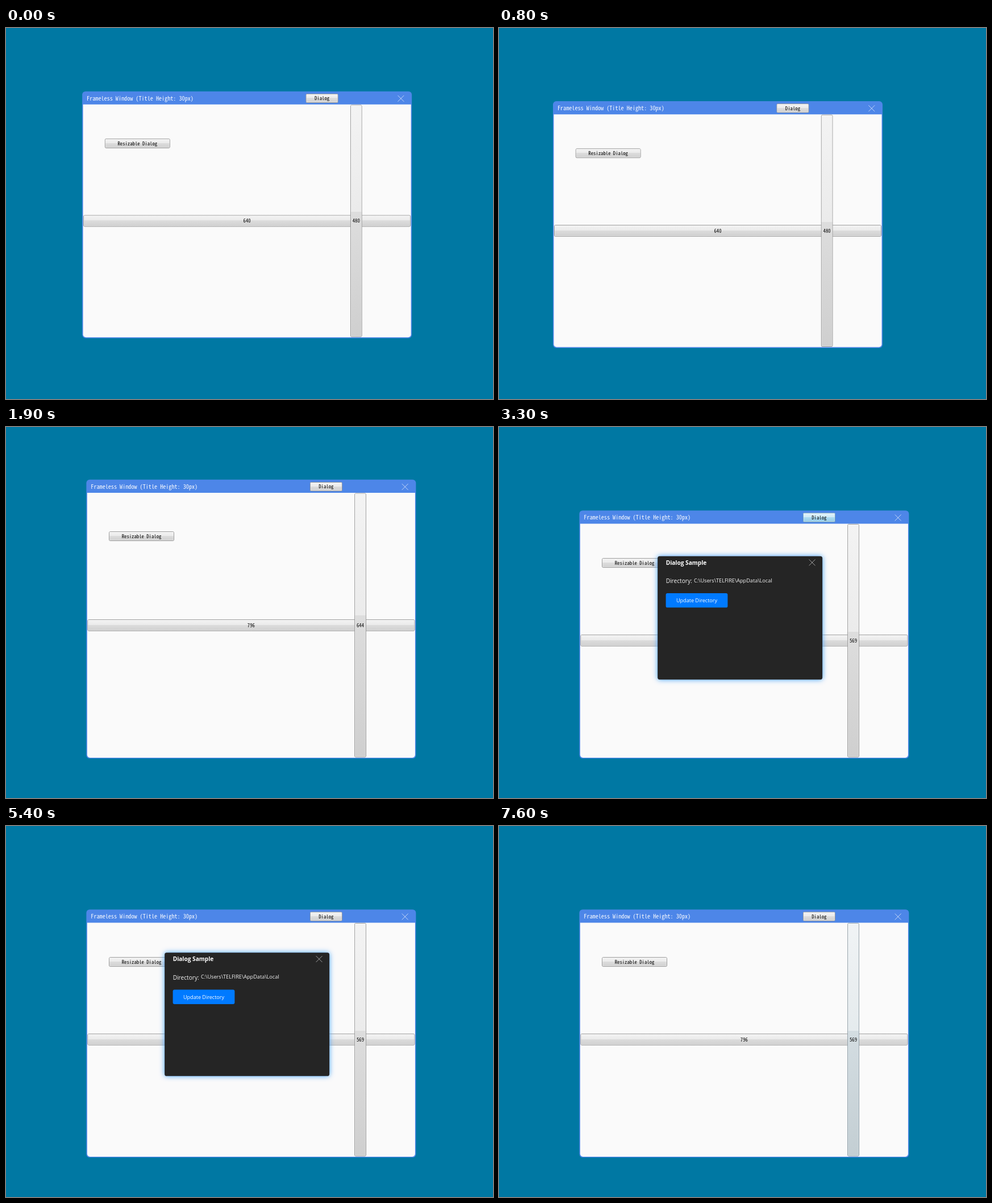
These frames come from a looping animation (857 by 654 pixels, 8 s). An HTML page with a canvas:

```html
<!DOCTYPE html>
<html lang="en">
<head>
<meta charset="utf-8">
<title>Frameless window</title>
<style>
  html, body { margin: 0; width: 100%; height: 100%; overflow: hidden; background: #0078a3; }
  canvas { display: block; }
</style>
</head>
<body>
<canvas id="stage" width="857" height="654"></canvas>
<script>
const ctx = document.getElementById('stage').getContext('2d');
const LOOP = 8000, STEP = 100;
const SCALE = 0.725; // the desktop is shown reduced; all lengths below are desktop pixels
const SANS = '"Open Sans", "Noto Sans", sans-serif';
const MONO = '"Noto Sans Mono CJK SC", "Noto Sans Mono CJK JP", "Liberation Mono", monospace';
const NORMAL = ['#f3f3f3', '#ebebeb', '#dddddd', '#cfcfcf', '#707070'];
const HOT = ['#e4f4fb', '#cdeaf7', '#aedcf3', '#94cbe4', '#3c7fb1'];
const WIDTH = 800, BORDER = 2, HEADER = 32, WINDOW_BOTTOM = 806;

// One entry per step: the window is dragged around, then its top edge is pulled.
const dragPath = [
  [185, 154], [248, 121], [331, 100], [383, 143], [326, 199], [204, 234], [131, 178],
  [154, 141], [229, 143], [303, 168], [295, 197], [243, 210], [195, 206]
];
const windowTops = [206, 168, 128, 94, 152, 203];
const dialogEdges = [[314, 614], [308, 608], [330, 630], [314, 614], [149, 614], [210, 614], [276, 614]];

const clamp = (v, lo = 0, hi = 1) => Math.min(hi, Math.max(lo, v));
const stepped = (list, t, start) =>
  list[clamp(Math.floor((t - start) / STEP) + 1, 0, list.length - 1)];

function box(x, y, w, h, radius, fill) {
  ctx.beginPath();
  ctx.roundRect(x, y, w, h, radius);
  ctx.fillStyle = fill;
  ctx.fill();
}

function text(str, x, y, font, color, align = 'left') {
  ctx.font = font;
  ctx.fillStyle = color;
  ctx.textAlign = align;
  ctx.fillText(str, x, y);
}

// Fixed-pitch font chosen by its character advance.
function monoFont(advance) {
  ctx.font = `100px ${MONO}`;
  return `${advance * 100 / ctx.measureText('0').width}px ${MONO}`;
}
const titleFont = monoFont(7);
const labelFont = monoFont(6);

function cross(x, y, color) {
  ctx.beginPath();
  for (const d of [-7.5, 7.5]) {
    ctx.moveTo(x - 7.5, y - d);
    ctx.lineTo(x + 7.5, y + d);
  }
  ctx.strokeStyle = color;
  ctx.lineWidth = 1.2;
  ctx.stroke();
}

function buttonFace(x, y, w, h, colors) {
  const shade = ctx.createLinearGradient(0, y, 0, y + h);
  [0, 0.462, 0.462, 1].forEach((stop, i) => shade.addColorStop(stop, colors[i]));
  box(x, y, w, h, 3, shade);
  ctx.lineWidth = 1;
  ctx.strokeStyle = colors[4];
  ctx.beginPath();
  ctx.roundRect(x + 0.5, y + 0.5, w - 1, h - 1, 2.5);
  ctx.stroke();
  ctx.strokeStyle = 'rgba(255,255,255,.6)';
  ctx.strokeRect(x + 1.5, y + 1.5, w - 3, h - 3);
}

function button(x, y, w, h, label, hover = 0) {
  buttonFace(x, y, w, h, NORMAL);
  if (hover > 0) {
    ctx.globalAlpha = hover;
    buttonFace(x, y, w, h, HOT);
    ctx.globalAlpha = 1;
  }
  text(label, x + w / 2, y + h / 2 + 4.5, labelFont, '#000', 'center');
}

function drawWindow(t) {
  const resized = t >= 1800;
  const [x, dragY] = stepped(dragPath, t, 300);
  const y = resized ? stepped(windowTops, t, 1800) : dragY;
  const h = resized ? WINDOW_BOTTOM - y : 600;
  const content = h - HEADER - BORDER;
  const top = y + HEADER;

  const dialogHover = t < 2800 ? 0 : t < 2900 ? 0.5 : clamp((3900 - t) / 600);
  const resizableHover = t < 4400 ? 0 : t < 4500 ? 0.5 : clamp((5000 - t) / 200);
  const barHover = t >= 7600 ? 0.2 : 0;

  box(x, y, WIDTH, h, 8, '#4d86e8');
  box(x + BORDER, top, WIDTH - 2 * BORDER, content, [0, 0, 7, 7], '#fafafa');
  text('Frameless Window (Title Height: 30px)', x + 11, y + 22.2, titleFont, '#fff');
  cross(x + 773.5, y + 17.5, 'rgba(255,255,255,.75)');
  button(x + 543, y + 6, 78, 22, 'Dialog', dialogHover);
  button(x + 55, top + 1 + Math.floor(content * 0.1459), 158, 23, 'Resizable Dialog', resizableHover);
  button(x + 3, top + 1 + Math.floor((content - 30) / 2), 794, 28, resized ? 796 : 640);
  button(x + 651, top + 1, 28, content - 2, resized ? content : 480, barHover);
}

function drawDialog(t) {
  const [top, bottom] = stepped(dialogEdges, t, 5400);
  const x = 385;
  ctx.save();
  ctx.shadowColor = '#3ea0ff';
  ctx.shadowBlur = 10;
  box(x, top, 400, bottom - top, 5, '#252525');
  ctx.restore();
  text('Dialog Sample', x + 20, top + 20.7, `700 14px ${SANS}`, '#fff');
  cross(x + 375, top + 15.5, t >= 6900 ? '#fff' : '#b4b4b4');
  text('Directory:', x + 20, top + 65.4, `14px ${SANS}`, '#f4f4f4');
  text('C:\\Users\\TELFIRE\\AppData\\Local', x + 88, top + 63.7, `12.6px ${SANS}`, '#f4f4f4');
  box(x + 20, top + 90, 150, 35, 4, '#007aff');
  text('Update Directory', x + 95, top + 112, `12.5px ${SANS}`, '#fff', 'center');
}

function draw(now) {
  const t = Math.floor((now % LOOP) / STEP) * STEP;
  ctx.setTransform(1, 0, 0, 1, 0, 0);
  ctx.fillStyle = '#0078a3';
  ctx.fillRect(0, 0, 857, 654);
  ctx.scale(SCALE, SCALE);
  drawWindow(t);
  if (t >= 3300 && t < 7400) drawDialog(t);
  requestAnimationFrame(draw);
}
requestAnimationFrame(draw);
</script>
</body>
</html>
```
